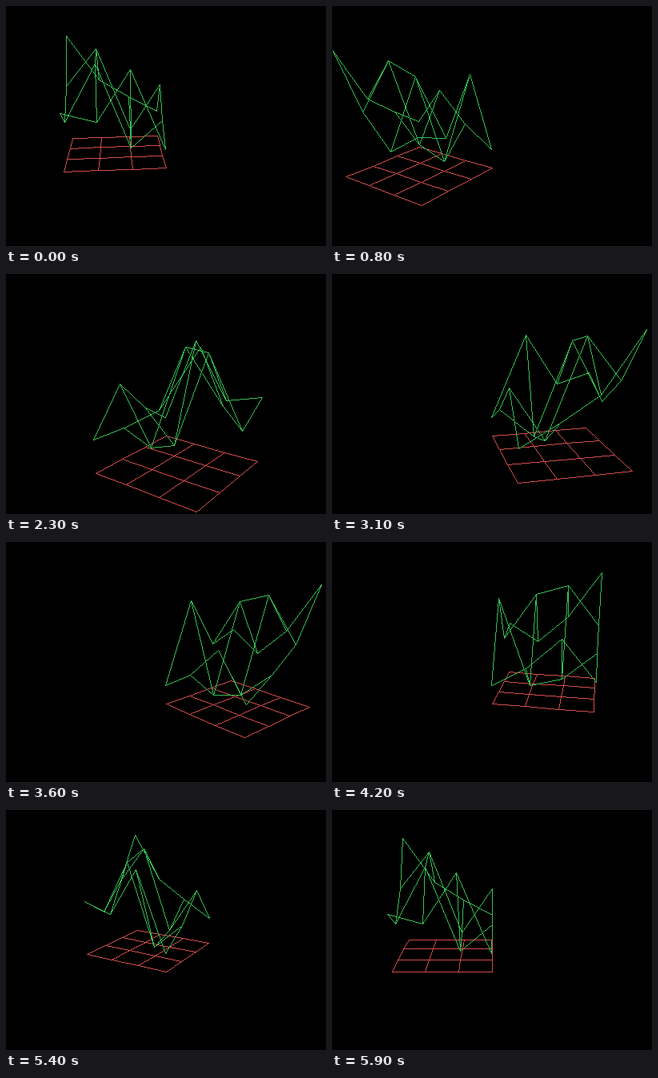
Write an HTML page with a canvas that moves like this. It is 400x300 px and loops after 6 s.

```html
<!DOCTYPE html>
<html lang="en">
<head>
<meta charset="utf-8">
<title>Rotating wireframe terrain</title>
<style>
html, body { margin: 0; width: 100%; height: 100%; overflow: hidden; background: #000; }
canvas { display: block; width: 400px; height: 300px; }
</style>
</head>
<body>
<canvas id="stage" width="400" height="300"></canvas>
<script>
const ctx = document.getElementById('stage').getContext('2d');
const SIZE = 4, STEPS = 60, STEP_MS = 100;
const TURN = 0.104719; // radians per step, just under 6 degrees
const RED = '#d04c4a', GREEN = '#35bd53';
const FLAT = Array.from({ length: SIZE }, () => Array(SIZE).fill(0));
const HEIGHTS = [
  [0.592, 1.185, 2.109, 0.916],
  [3.005, 0.306, 0.596, 1.470],
  [1.505, 2.997, 3.308, 2.095],
  [1.795, 1.211, 2.109, 3.603]
];

// Camera: focal length, distance and drop of the pivot (in cells), pitch
const FOCAL = 587.5, DIST = 14.1, DROP = 1.2588, PITCH = 0.3083;
const SIN = Math.sin(PITCH), COS = Math.cos(PITCH);
const LEAN = 1e-6; // settles which pixel column the upright axis falls in

function project(i, j, height, angle) {
  const s = Math.sin(angle), c = Math.cos(angle);
  const x = -i * c - j * s - height * LEAN;
  const depth = j * c - i * s;
  const scale = FOCAL / (DIST + depth * COS - height * SIN);
  const y = depth * SIN + height * COS - DROP;
  return [Math.floor(200 + x * scale), Math.floor(150 - y * scale)];
}

// Hard-edged line, one pixel wide
function line([x0, y0], [x1, y1]) {
  const dx = x1 - x0, dy = y1 - y0;
  const n = Math.max(Math.abs(dx), Math.abs(dy), 1);
  for (let k = 0; k <= n; k++) {
    ctx.fillRect(Math.round(x0 + dx * k / n), Math.round(y0 + dy * k / n), 1, 1);
  }
}

function drawMesh(heights, color, angle) {
  const pts = heights.map((row, i) => row.map((h, j) => project(i, j, h, angle)));
  ctx.fillStyle = color;
  for (let i = 0; i < SIZE; i++) {
    for (let j = 0; j < SIZE; j++) {
      if (i + 1 < SIZE) line(pts[i][j], pts[i + 1][j]);
      if (j + 1 < SIZE) line(pts[i][j], pts[i][j + 1]);
    }
  }
}

function draw(step) {
  const angle = (step + 1) * TURN;
  ctx.fillStyle = '#000';
  ctx.fillRect(0, 0, 400, 300);
  drawMesh(FLAT, RED, angle);
  drawMesh(HEIGHTS, GREEN, angle);
}

const start = performance.now();
let shown = -1;
function tick() {
  const step = Math.floor((performance.now() - start) / STEP_MS) % STEPS;
  if (step !== shown) draw(shown = step);
  requestAnimationFrame(tick);
}
tick();
</script>
</body>
</html>
```
